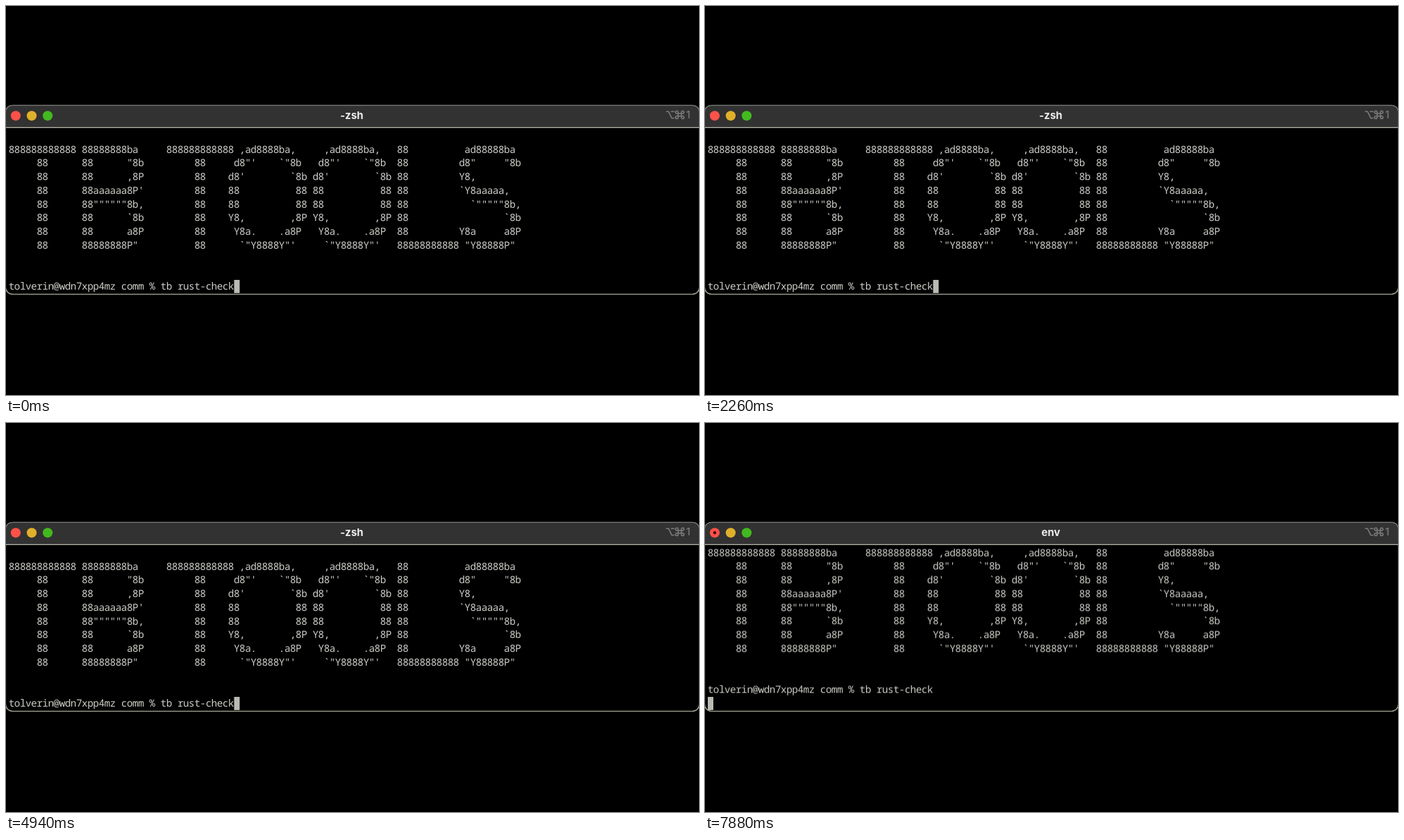
An HTML page for the animation above (8000 ms loop, 998 by 561 pixels).

```html
<!DOCTYPE html>
<html lang="en">
<head>
<meta charset="utf-8">
<title>Terminal</title>
<style>
  :root { --loop: 8000ms step-end infinite; --row: 19.75px; --col: 8.112px; }
  html, body { margin: 0; width: 100%; height: 100%; overflow: hidden; background: #000; }
  .stage { position: relative; width: 998px; height: 561px; overflow: hidden; }
  .window { position: absolute; left: 0; top: 0; }
  .title {
    position: absolute; left: 0; top: 148px; width: 996px; line-height: 20px;
    text-align: center; color: #eee; font: 700 15px/20px Inter, sans-serif;
  }
  .shell { animation: leave var(--loop); }
  .job, .busy { opacity: 0; animation: arrive var(--loop); }
  pre {
    position: absolute; left: 3.7px; top: 197.6px; margin: 0; color: #cdcdc8;
    font: 500 14.4px/var(--row) "Noto Sans Mono", monospace; letter-spacing: -0.528px;
    font-variant-ligatures: none; text-rendering: geometricPrecision;
    animation: scroll var(--loop);
  }
  .cursor {
    position: absolute; left: 3.5px; top: 394.5px; width: 8.5px; height: 19.5px;
    background: #bbbbb4; animation: newline var(--loop);
  }
  @keyframes scroll {
    0% { transform: none; }
    91.2%, 100% { transform: translateY(calc(-1 * var(--row))); }
  }
  @keyframes newline {
    0% { transform: translateX(calc(40 * var(--col))); }
    91.2%, 100% { transform: none; }
  }
  @keyframes leave { 0% { opacity: 1; } 94%, 100% { opacity: 0; } }
  @keyframes arrive { 0% { opacity: 0; } 94%, 100% { opacity: 1; } }
</style>
</head>
<body>
<div class="stage">
  <svg class="window" width="998" height="561">
    <rect x="-.6" y="143.4" width="999.2" height="272.2" rx="10" stroke="#aaaa9a" stroke-width="1.4"/>
    <path d="M-.6 175.3V153.4a10 10 0 0 1 10-10H988.6a10 10 0 0 1 10 10V175.3z" fill="#323232" stroke="#777"/>
    <path d="M0 175.4H998" stroke="#b0b0a4" stroke-width="1.4"/>
    <circle cx="14" cy="158.3" r="7.1" fill="#fc5148"/>
    <circle class="busy" cx="14" cy="158.3" r="2.2" fill="#400b08"/>
    <circle cx="37" cy="158.3" r="7.1" fill="#dfb02b"/>
    <circle cx="60" cy="158.3" r="7.1" fill="#43b91f"/>
    <g fill="none" stroke="#7c7c7c" stroke-width="1.5">
      <path d="M950.5 152.3h3.7l4.6 9.4h3.7M957.6 152.3h4.9"/>
      <path d="M968 153.1v7.6a1.9 1.9 0 1 1-1.9-1.9h8.4a1.9 1.9 0 1 1-1.9 1.9v-7.6a1.9 1.9 0 1 1 1.9 1.9h-8.4a1.9 1.9 0 1 1 1.9-1.9z"/>
    </g>
    <text x="979.5" y="162" fill="#7c7c7c" font-family="Inter, sans-serif" font-size="14.5" font-weight="500">1</text>
  </svg>
  <div class="title shell">-zsh</div>
  <div class="title job">env</div>
<pre>888888888888 88888888ba     888888888888 ,ad8888ba,     ,ad8888ba,   88          ad88888ba
     88      88      "8b         88     d8"'    `"8b   d8"'    `"8b  88         d8"     "8b
     88      88      ,8P         88    d8'        `8b d8'        `8b 88         Y8,
     88      88aaaaaa8P'         88    88          88 88          88 88         `Y8aaaaa,
     88      88""""""8b,         88    88          88 88          88 88           `"""""8b,
     88      88      `8b         88    Y8,        ,8P Y8,        ,8P 88                 `8b
     88      88      a8P         88     Y8a.    .a8P   Y8a.    .a8P  88         Y8a     a8P
     88      88888888P"          88      `"Y8888Y"'     `"Y8888Y"'   88888888888 "Y88888P"


tolverin@wdn7xpp4mz comm % tb rust-check</pre>
  <div class="cursor"></div>
</div>
</body>
</html>
```
